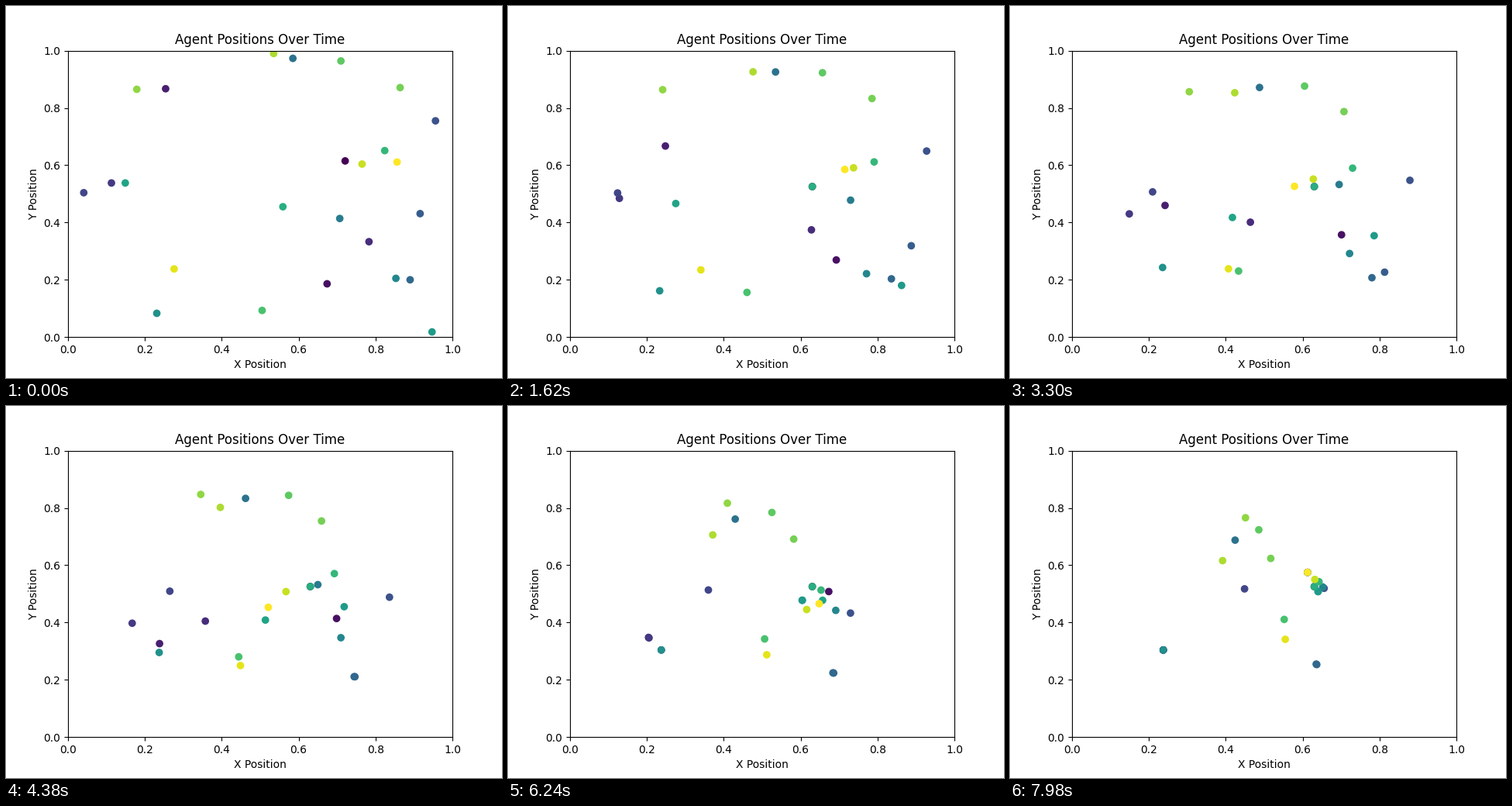
These frames come from a looping animation (640 by 480 pixels, 8000 ms). A matplotlib script:

```python
import numpy as np
import matplotlib.pyplot as plt
from matplotlib.animation import FuncAnimation

TICK = 20          # ms per drawn frame
HOLD = 3           # drawn frames per simulation step
FRAMES = 400
STEPS = (FRAMES - 1) // HOLD

# Each agent: start x and y (thousandths), agent it follows,
# speed per step (hundred-thousandths)
AGENTS = np.array([
    (721, 615, 15, 607), (674, 186, 19, 316), (254, 867, 12, 741),
    (783, 333, 4, 594), (113, 538, 12, 207), (41, 504, 15, 307),
    (956, 755, 11, 405), (916, 431, 8, 430), (890, 200, 23, 200),
    (585, 973, 5, 256), (707, 414, 22, 253), (853, 205, 1, 314),
    (231, 83, 2, 291), (947, 18, 10, 678), (149, 538, 1, 538),
    (559, 455, 0, 480), (824, 651, 24, 232), (505, 93, 14, 286),
    (710, 964, 4, 249), (864, 871, 4, 323), (179, 865, 19, 230),
    (535, 990, 5, 322), (765, 604, 24, 418), (276, 238, 11, 239),
    (856, 611, 14, 532),
])
LEADER = AGENTS[:, 2]
SPEED = AGENTS[:, 3] * 1e-5


def chase(pos):
    """Move every agent one step towards its leader, in turn."""
    pos = pos.copy()
    for i, (leader, speed) in enumerate(zip(LEADER, SPEED)):
        gap = pos[leader] - pos[i]
        dist = np.hypot(*gap)
        pos[i] += gap * min(1, speed / max(dist, 1e-9))
    return pos


path = [AGENTS[:, :2] / 1000]
for _ in range(STEPS):
    path.append(chase(path[-1]))

fig, ax = plt.subplots(figsize=(6.4, 4.8), dpi=100)
dots = ax.scatter(*path[0].T, c=range(len(AGENTS)), cmap="viridis")
ax.set(xlim=(0, 1), ylim=(0, 1), xlabel="X Position", ylabel="Y Position",
       title="Agent Positions Over Time")


def update(frame):
    dots.set_offsets(path[frame // HOLD])
    return (dots,)


anim = FuncAnimation(fig, update, frames=FRAMES, interval=TICK,
                     repeat=True, repeat_delay=0)
plt.show()
```
